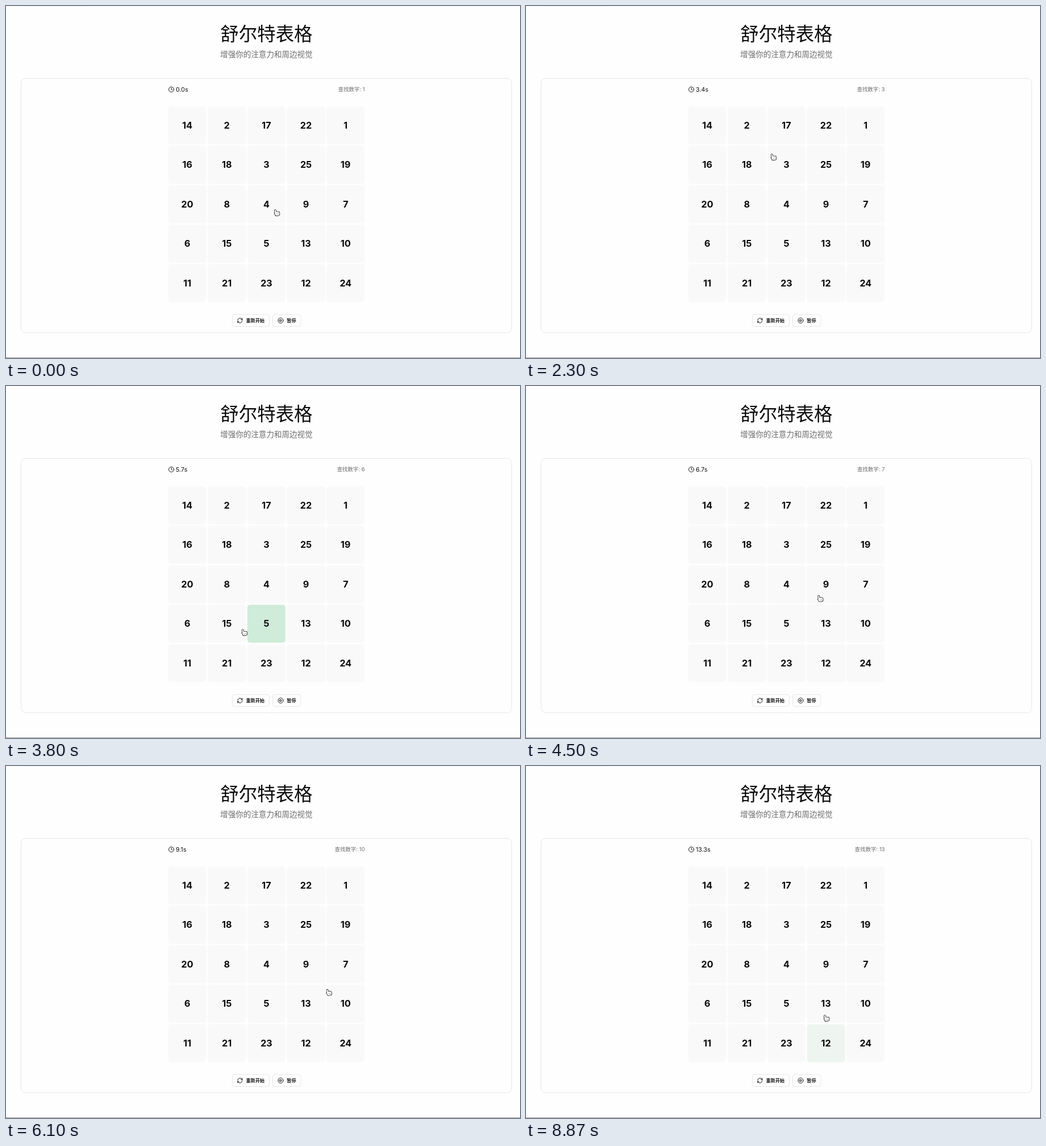
Animation, 903 px wide and 620 px high, one loop 9.04 s. Source, as an HTML page with a canvas:

```html
<!DOCTYPE html>
<html lang="zh-CN">
<head>
<meta charset="utf-8">
<title>舒尔特表格</title>
<style>
  html, body { margin: 0; width: 100%; height: 100%; overflow: hidden; background: #fefefe; }
  canvas { display: block; width: 903px; height: 620px; }
</style>
</head>
<body>
<canvas id="stage"></canvas>
<script>
const W = 903, H = 620, LOOP = 9040, LAST = 8870;
const FONT = 'Inter, "Noto Sans CJK SC", "Noto Sans CJK", sans-serif';
const INK = '#0a0a0a', MUTED = '#6b6b6b', BORDER = '#e7e7e7';
const canvas = document.getElementById('stage');
const ctx = canvas.getContext('2d');
const dpr = window.devicePixelRatio || 1;
canvas.width = W * dpr;
canvas.height = H * dpr;

const GRID = { x: 285, y: 176.7, size: 66.8, pitch: 69.55 };
const numbers = '14 2 17 22 1 16 18 3 25 19 20 8 4 9 7 6 15 5 13 10 11 21 23 12 24'
  .split(' ').map(Number);

// Moment at which 1, 2, 3 ... is clicked
const clicks = [1071, 2010, 2400, 2900, 3696, 4120, 4700, 5290, 5750, 6350, 7350, 8702];

function cellAt(i) {
  return {
    x: GRID.x + (i % 5) * GRID.pitch,
    y: GRID.y + Math.floor(i / 5) * GRID.pitch
  };
}

// The pointer visits each number when it is clicked, with a few detours while searching
const detours = [
  [0, 476, 364], [600, 562, 49], [1200, 541, 285], [1500, 470, 442],
  [2300, 435, 266], [3800, 419, 434], [5300, 411, 348], [7200, 340, 514],
  [8400, 543, 518], [LAST, 528, 444]
];
const visits = clicks.map((time, i) => {
  const { x, y } = cellAt(numbers.indexOf(i + 1));
  return [time, x + GRID.size / 2 - 3, y + GRID.size / 2 + 6];
});
const stops = [...detours, ...visits].sort((a, b) => a[0] - b[0]);

const RING = 'M22 12A10 10 0 1 1 2 12A10 10 0 1 1 22 12';
const CLOCK = new Path2D(RING + 'M12 6v6l4 2');
const STOP = new Path2D(RING + 'M9 9h6v6h-6z');
const HALF_TURN = new Path2D('M3 12a9 9 0 0 1 15.7-6.3L21 8M21 3v5h-5');

const ARROW = new Path2D('M-3.5-6V4.5L-1.2 2.4L.4 6L2 5.3L.5 1.8H3.8Z');
const HAND = new Path2D();
HAND.roundRect(-3.6, -5.2, 2.2, 8, 1.1);
for (let i = 0; i < 3; i++) HAND.roundRect(-1.6 + 1.9 * i, -1.7 + 0.4 * i, 2, 5, 1);
HAND.roundRect(-3.4, 0.4, 7.4, 4.8, 2);
HAND.moveTo(-2.6, 3.4);
HAND.lineTo(-4.6, 0.6);
HAND.lineTo(-3, 0.4);

function text(str, x, y, size, color, weight = 400, align = 'left') {
  ctx.font = `${weight} ${size}px ${FONT}`;
  ctx.textAlign = align;
  ctx.fillStyle = color;
  ctx.fillText(str, x, y);
}

function box(x, y, w, h, r, fill, stroke) {
  ctx.beginPath();
  ctx.roundRect(x, y, w, h, r);
  if (fill) {
    ctx.fillStyle = fill;
    ctx.fill();
  }
  if (stroke) {
    ctx.strokeStyle = stroke;
    ctx.lineWidth = 1;
    ctx.stroke();
  }
}

// Strokes a 24-unit icon, optionally repeated by rotation
function icon(path, cx, cy, copies = 1) {
  ctx.save();
  ctx.translate(cx, cy);
  ctx.scale(0.45, 0.45);
  ctx.strokeStyle = '#111';
  ctx.lineWidth = 2.2;
  ctx.lineCap = ctx.lineJoin = 'round';
  for (let i = 0; i < copies; i++) {
    ctx.save();
    ctx.rotate(i * 2 * Math.PI / copies);
    ctx.translate(-12, -12);
    ctx.stroke(path);
    ctx.restore();
  }
  ctx.restore();
}

// Quick fade in, short hold, fade out
function flash(n, t) {
  const u = t - clicks[n - 1];
  if (!(u > 0 && u < 190)) return 0;
  return Math.min(1, u / 60, (190 - u) / 90);
}

function cellColor(amount) {
  const mix = (a, b) => Math.round(a + (b - a) * amount);
  return `rgb(${mix(249, 205)},${mix(249, 234)},${mix(249, 215)})`;
}

function drawGrid(t) {
  numbers.forEach((n, i) => {
    const { x, y } = cellAt(i);
    box(x, y, GRID.size, GRID.size, 5, cellColor(flash(n, t)));
    text(n, x + GRID.size / 2, Math.round(y + 38.9), 16.2, INK, 700, 'center');
  });
}

function pointerAt(t) {
  const i = Math.max(1, stops.findIndex(stop => stop[0] >= t));
  const [t0, x0, y0] = stops[i - 1], [t1, x1, y1] = stops[i];
  const u = (t - t0) / (t1 - t0);
  const e = u * u * (3 - 2 * u);
  return [x0 + (x1 - x0) * e, y0 + (y1 - y0) * e];
}

function drawPointer(t) {
  const [x, y] = pointerAt(t);
  const onGrid = x > 283 && x < 632 && y > 177 && y < 523;
  const shape = onGrid ? HAND : ARROW;
  ctx.save();
  ctx.translate(x, y);
  ctx.lineJoin = 'round';
  ctx.lineWidth = 1.7;
  ctx.strokeStyle = onGrid ? '#222' : '#fff';
  ctx.fillStyle = onGrid ? '#fff' : '#111';
  if (onGrid) ctx.rotate(-0.12);
  ctx.stroke(shape);
  ctx.fill(shape);
  if (onGrid) {
    ctx.fillStyle = '#777';
    for (let i = 0; i < 3; i++) ctx.fillRect(-0.9 + 1.5 * i, 1.6, 0.6, 2);
  }
  ctx.restore();
}

function drawPage() {
  ctx.fillStyle = '#fefefe';
  ctx.fillRect(0, 0, W, H);
  ctx.fillStyle = '#f5f5f5';
  ctx.fillRect(25, 0, 127, 1);
  ctx.fillStyle = '#999';
  ctx.fillRect(0, 619, W, 1);
  text('舒尔特表格', 457.5, 61, 32.4, INK, 400, 'center');
  text('增强你的注意力和周边视觉', 457.5, 90, 13.5, MUTED, 400, 'center');
  box(26.5, 127.5, 862, 448, 8, null, BORDER);
  box(397.5, 543.5, 65, 21, 4, null, BORDER);
  box(468.5, 543.5, 49.5, 21, 4, null, BORDER);
  icon(HALF_TURN, 411, 554, 2);
  icon(STOP, 482.5, 554);
  text('重新开始', 421.7, 557, 8.1, '#111', 600);
  text('暂停', 493.3, 557, 8.1, '#111', 600);
}

function drawStatus(t) {
  const seconds = Math.floor(t * 0.015 + 1e-6) / 10;
  const next = 1 + clicks.filter(c => t >= c).length;
  icon(CLOCK, 290.4, 147);
  text(seconds.toFixed(1) + 's', 298.2, 151, 10.8, '#111');
  text('查找数字: ' + next, 630.4, 150, 9.45, MUTED, 400, 'right');
}

function draw(t) {
  ctx.setTransform(dpr, 0, 0, dpr, 0, 0);
  drawPage();
  drawStatus(Math.max(0, t));
  drawGrid(t);
  drawPointer(t);
}

// Time advances in steps of 100 ms, with a longer hold near the end
function step(t) {
  return t >= LAST ? LAST : Math.min(8700, Math.floor(t / 100) * 100);
}

// The number shown lags slightly behind the flash of its cell
const LABEL_LAG = 15;
const drawStatusNow = drawStatus;

const start = performance.now();
function tick() {
  draw(step((performance.now() - start) % LOOP));
  requestAnimationFrame(tick);
}
tick();
</script>
</body>
</html>
```
